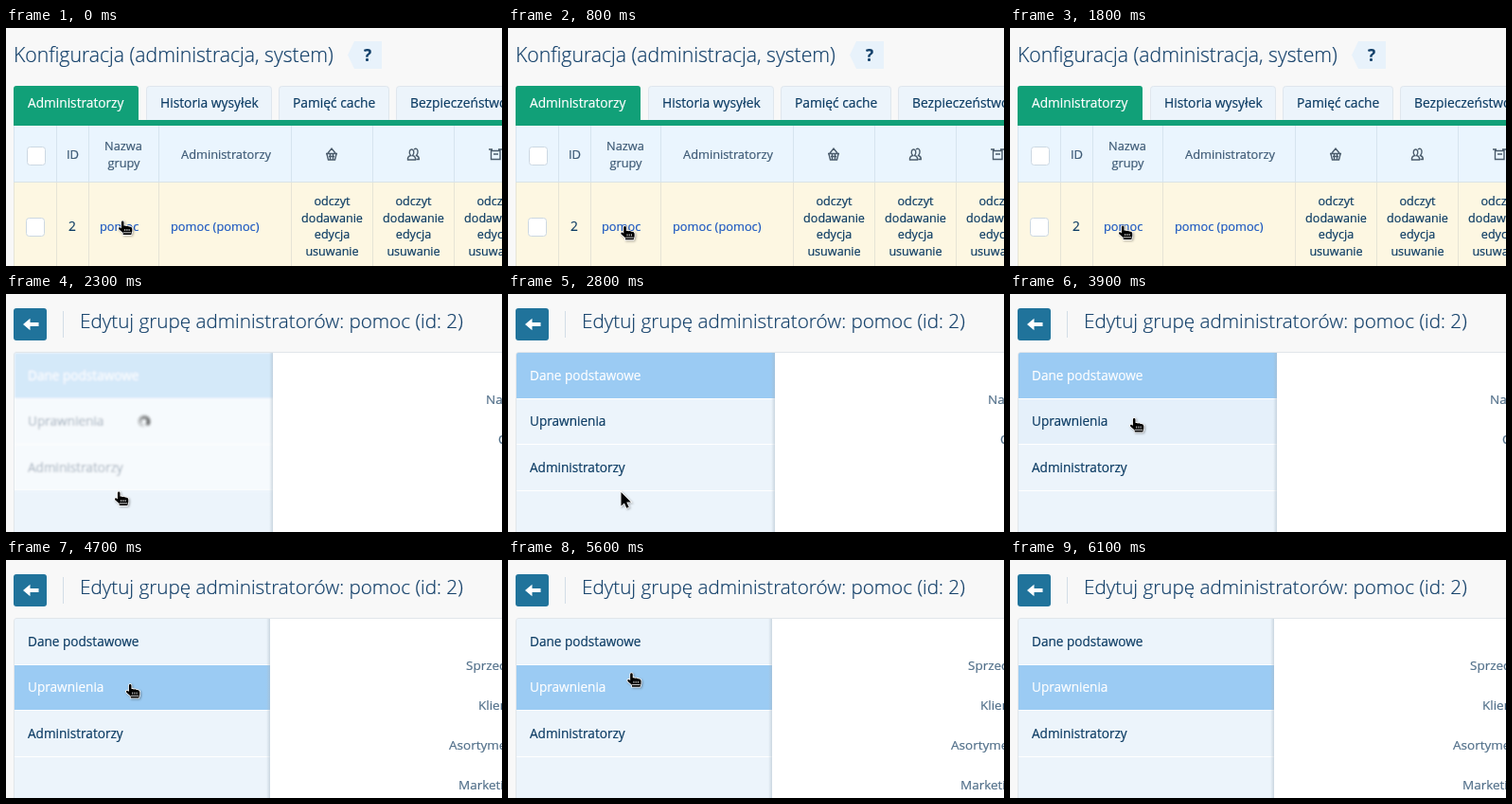
An HTML page that plays this animation: 524 by 251 pixels, repeating every 6.8 s.

```html
<!DOCTYPE html>
<html lang="pl">
<head>
<meta charset="utf-8">
<title>Konfiguracja</title>
<style>
html, body { margin: 0; width: 100%; height: 100%; overflow: hidden; background: #f8f8f8; }
svg { display: block; width: 524px; height: 251px; font-family: "Open Sans", "Noto Sans", sans-serif; }
</style>
</head>
<body>
<svg id="stage" viewBox="0 0 524 251" xmlns="http://www.w3.org/2000/svg"></svg>
<script>
const LOOP = 6800, STEP = 100;
const NAVY = '#0b3b63', TITLE = '#123f69', LINK = '#1c58c0', HEAD = '#3d5a75', LABEL = '#52708a';

const rect = (x, y, w, h, fill, extra = '') =>
  `<rect x="${x}" y="${y}" width="${w}" height="${h}" fill="${fill}" ${extra}/>`;
// a hairline stroke gives the text a slightly firmer weight
const text = (x, y, s, size, fill, extra = '') =>
  `<text x="${x}" y="${y}" font-size="${size}" fill="${fill}" stroke="${fill}" stroke-width=".2" ${extra}>${s}</text>`;
const mid = (x, y, s, size, fill) => text(x, y, s, size, fill, 'text-anchor="middle"');
const path = (d, extra) => `<path d="${d}" ${extra}/>`;
const group = (id, body, extra = '') => `<g id="${id}" ${extra}>${body}</g>`;
const box = (x, y) => rect(x, y, 19, 19, '#fff', 'rx="3" stroke="#ccd8e2"');

function tab(x, w, label) {
  return rect(x + .5, 61.5, w, 38, '#ecf4fb', 'rx="3" stroke="#dfe6ed"') + text(x + 15, 84, label, 13.8, NAVY);
}

function icons() {
  const line = 'fill="none" stroke="#4a5b6b" stroke-width="1.4"';
  const basket = path('M340 132L344 127L348 132M338 132.5H350M339 133L340.5 139H347.5L349 133M341 135.5H347M342.5 133V139M345.5 133V139', line);
  const people = path('M424.5 139Q424 135.5 427.5 134.5Q425.5 132 426.5 129.5Q428.5 126.5 430.6 129.5Q431.5 132 429.6 134.5Q433 135.5 432.6 139ZM431 128Q434 126 435 129.5Q435.5 132 433.6 134.5Q436.5 135.5 436.3 138.5H433.5', line);
  const crate = path('M512.5 129.5H522V138.5H512.5ZM510 128H514M520 128H524M515 133H520', line);
  return basket + people + crate;
}

function listPage() {
  let s = text(8, 36, 'Konfiguracja (administracja, system)', 21.2, TITLE, 'font-weight="300"');
  s += path('M361 28.5L368 14H397V43H368Z', 'fill="#e8f2fb"') +
    text(382, 35, '?', 17, TITLE, 'text-anchor="middle" font-weight="700"');
  s += tab(148, 132, 'Historia wysyłek') + tab(288, 116, 'Pamięć cache') + tab(412, 130, 'Bezpieczeństwo');
  s += rect(8, 61, 132, 42, '#11a078', 'rx="3"') + rect(8, 97, 516, 6, '#11a078') +
    text(23, 84, 'Administratorzy', 13.7, '#fff');
  s += rect(8, 103, 516, 59, '#eaf5fe') + rect(8, 162, 516, 89, '#fdf7e2');
  for (const x of [8, 53, 87, 161, 301, 387, 473])
    s += rect(x, 103, 1, 59, '#d6e4ef') + rect(x, 162, 1, 89, '#e6e4d6');
  s += rect(8, 162, 516, 1, '#d9e3e6');
  s += box(22.5, 125.5) + box(21.5, 200.5);
  s += mid(70.5, 138, 'ID', 13, HEAD) + mid(124, 129, 'Nazwa', 12.8, HEAD) +
    mid(124.5, 147, 'grupy', 12.8, HEAD) + mid(232.5, 138, 'Administratorzy', 12.8, HEAD) + icons();
  s += mid(70, 214, '2', 13.7, NAVY) + text(99, 214, 'pomoc', 12.8, LINK) + text(174, 214, 'pomoc (pomoc)', 12.8, LINK);
  for (const x of [344.5, 430.5, 516.5])
    ['odczyt', 'dodawanie', 'edycja', 'usuwanie'].forEach((w, i) => s += mid(x, 187 + i * 17.7, w, 12.6, NAVY));
  return s;
}

const rows = ['Dane podstawowe', 'Uprawnienia', 'Administratorzy'];
const rowTop = i => Math.round(62 + i * 48.5);

function editPage() {
  let s = rect(8, 15, 35, 34, '#20739b', 'rx="3"') +
    path('M18 32L25.5 25.7V30H34.5V34H25.5V38.3Z', 'fill="#fff"') + rect(60, 18, 1, 28, '#d3dde6');
  s += text(78, 36, 'Edytuj grupę administratorów: pomoc (id: 2)', 20.7, TITLE, 'font-weight="300"');
  s += rect(8, 61, 530, 200, '#fff', 'rx="3"') + rect(9, 207, 274, 44, '#ecf4fb');
  let list = '';
  rows.forEach((name, i) => {
    const top = rowTop(i), end = rowTop(i + 1) - 1;
    list += rect(9, top, 274, end - top, '#ecf4fb', `id="row${i}"`) + rect(9, end, 274, 1, '#fff') +
      text(23, Math.floor(91 + i * 48.5), name, 13.6, NAVY, `id="name${i}"`);
  });
  s += group('list', list);
  let ring = '';
  for (let i = 0; i < 12; i++)
    ring += `<circle cx="4.6" r="2.4" fill="#222" opacity="${(i * .04).toFixed(2)}" transform="rotate(${i * 30})"/>`;
  s += group('spinner', ring, 'filter="url(#soft)"');
  s += group('side', rect(-4, 62, 4, 189, 'url(#shade)') + rect(0, 62, 260, 189, '#fff'));
  s += path('M8.5 251V64Q8.5 61.5 11 61.5H524', 'fill="none" stroke="#e1e6ea"');
  s += group('basic', text(507, 116, 'Nazwa', 13.5, LABEL) + text(520, 158, 'Opis', 13.5, LABEL));
  s += group('rights', [[486, 'Sprzedaż'], [499, 'Klienci'], [468, 'Asortyment'], [478, 'Marketing']]
    .map(([x, w], i) => text(x, 116 + i * 42, w, 13.5, LABEL)).join(''));
  return s;
}

const hand = path('M3.4 2Q3.4 .6 4.7 .6Q6 .6 6 2V5.6Q7.6 5 8.7 6Q10.3 5.4 11.4 6.5Q14.4 6.2 14.8 8.4V11.4L13.8 15H5.2V13L.8 9.2Q0 7.6 1.2 7.2Q2.4 7 3.4 8.4Z',
  'stroke="#fff" stroke-width="1.6" paint-order="stroke"') +
  path('M7.2 9V11M9.4 9V11M11.6 9V11M5.4 12.8H13.8', 'stroke="#fff" stroke-width=".8" fill="none"');
const arrow = path('M0 0V14.5L3.4 11.4L5.8 16.8L8.2 15.7L5.8 10.5H10.4Z',
  'stroke="#fff" stroke-width="1.6" paint-order="stroke"');

document.getElementById('stage').innerHTML =
  `<defs><linearGradient id="shade"><stop stop-color="#a9b9c6" stop-opacity="0"/><stop offset="1" stop-color="#a9b9c6" stop-opacity=".5"/></linearGradient>
   <filter id="soft" x="-20%" y="-20%" width="140%" height="140%"><feGaussianBlur id="blur" stdDeviation="1"/></filter></defs>` +
  rect(0, 0, 524, 251, '#f8f8f8') + group('listPage', listPage()) + group('editPage', editPage()) +
  group('tip', rect(119, 230, 62, 24, '#262626', 'rx="3"') + mid(150, 246, 'Edytuj', 12, '#fff')) +
  group('cursor', group('hand', hand, 'transform="translate(-5 -1)"') + group('arrow', arrow),
    'style="filter:drop-shadow(1px 1px 1px rgba(0,0,0,.3))"');

const $ = id => document.getElementById(id);
const show = (id, on) => $(id).setAttribute('display', on ? 'inline' : 'none');
const set = (id, name, value) => $(id).setAttribute(name, value);

// pointer tip: time, x, y
const track = [
  [0, 123.5, 204], [200, 129, 206], [400, 136, 211], [700, 128, 210], [1000, 115.5, 208], [1100, 119.5, 209],
  [3100, 119.5, 209], [3400, 150, 190], [3500, 157, 173], [3700, 142, 142], [3800, 131, 133], [3900, 131.5, 131.5],
  [5500, 131.5, 131.5], [5700, 130, 108], [6000, 122, 6], [6100, 119, -30]
];

function pointer(t) {
  const i = track.findIndex(k => k[0] > t);
  if (i < 0) return track[track.length - 1].slice(1);
  const [t0, x0, y0] = track[i - 1], [t1, x1, y1] = track[i], p = (t - t0) / (t1 - t0);
  return [x0 + (x1 - x0) * p, y0 + (y1 - y0) * p];
}

function draw(time) {
  const t = Math.floor(time % LOOP / STEP) * STEP;
  const edit = t >= 2300, rights = t >= 4700;
  show('listPage', !edit);
  show('editPage', edit);
  show('tip', t >= 1600 && t < 1800);

  const [x, y] = pointer(t);
  const over = Math.floor((y - 62) / 48.5);
  const onRow = over >= 0 && over < 3;
  const link = t <= 2300 || onRow;
  set('cursor', 'transform', `translate(${x} ${y})`);
  show('cursor', t < 6100);
  show('hand', link);
  show('arrow', !link);

  const active = rights ? 1 : 0;
  rows.forEach((_, i) => {
    const hover = t < 6100 && i === over, ink = i === active ? '#fff' : NAVY;
    set('row' + i, 'fill', i === active ? '#9bcbf3' : hover ? '#e5f0fa' : '#ecf4fb');
    set('name' + i, 'fill', ink);
    set('name' + i, 'stroke', ink);
  });

  const load = Math.min(1, Math.max(0, (t - 2300) / 500));
  set('list', 'opacity', .42 + .58 * load);
  if (load < 1) set('list', 'filter', 'url(#soft)');
  else $('list').removeAttribute('filter');
  set('blur', 'stdDeviation', 1 - load);
  set('spinner', 'transform', `translate(146 134.5) rotate(${(t - 2300) * .36 + 60})`);
  set('spinner', 'opacity', 1 - load);

  set('side', 'transform', `translate(${rights ? 279 : 282} 0)`);
  show('basic', !rights);
  show('rights', rights);
}

function frame() {
  draw(performance.now());
  requestAnimationFrame(frame);
}
frame();
</script>
</body>
</html>
```
